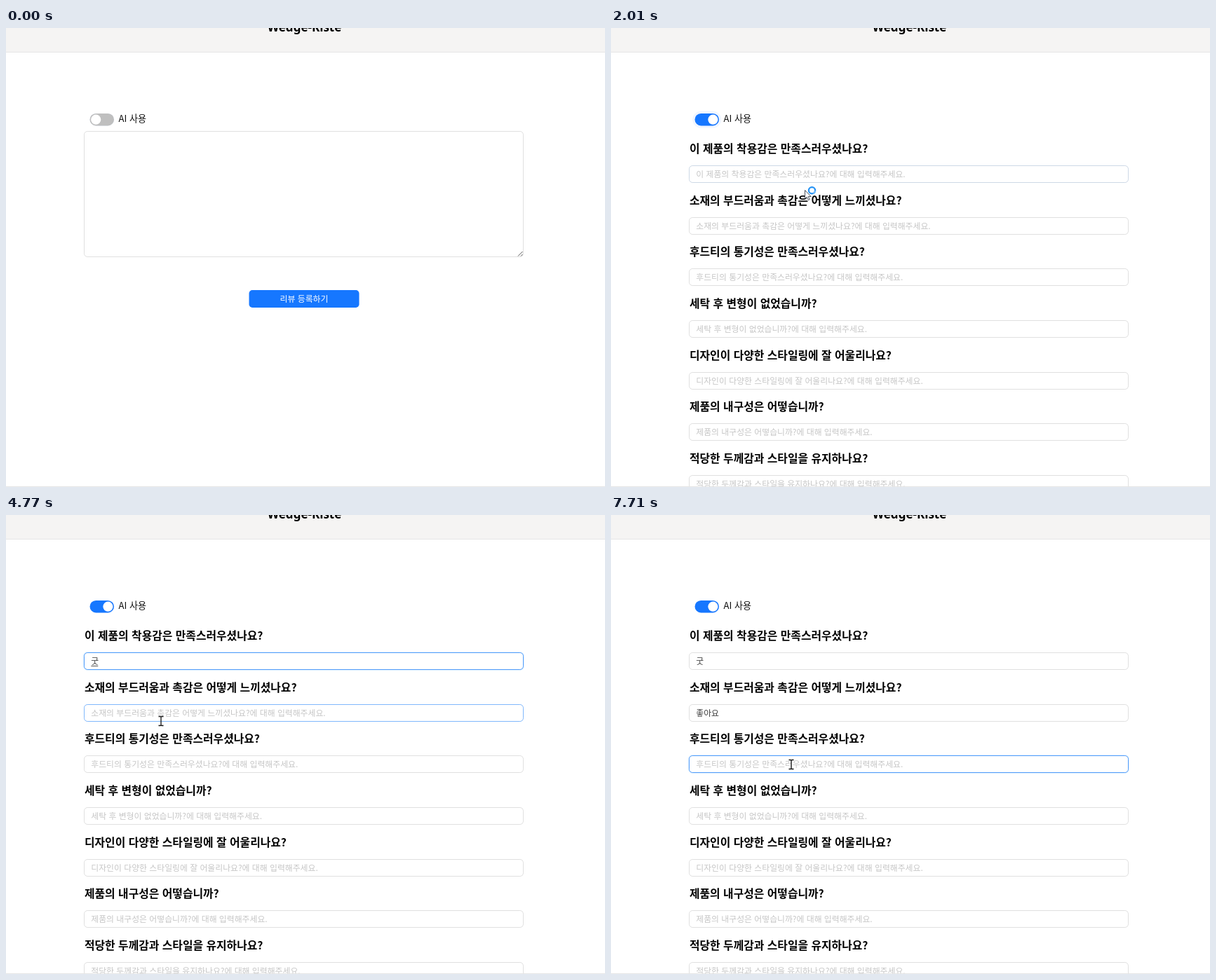
Recreate the animation shown at these times as an HTML page. Size 854 by 655 pixels, loop 8000 ms.

```html
<!DOCTYPE html>
<html lang="ko">
<head>
<meta charset="utf-8">
<title>리뷰 등록</title>
<style>
  html, body { margin: 0; width: 100%; height: 100%; overflow: hidden; background: #fff; }
  svg { display: block; font-family: "Noto Sans CJK KR", "Noto Sans CJK", sans-serif; }
  .title { font: 700 17px "Noto Sans", sans-serif; text-anchor: middle; }
  .question { font-size: 15.83px; font-weight: 700; }
  .field { font-size: 11.86px; }
  .label { font-size: 13.1px; }
</style>
</head>
<body>
<svg id="stage" width="854" height="655" viewBox="0 0 854 655"></svg>
<script>
const LOOP = 8000, TOGGLE = 1740, SYLLABLE = 10.9, TEXT_X = 121.3;
const QUESTIONS = [
  '이 제품의 착용감은 만족스러우셨나요?',
  '소재의 부드러움과 촉감은 어떻게 느끼셨나요?',
  '후드티의 통기성은 만족스러우셨나요?',
  '세탁 후 변형이 없었습니까?',
  '디자인이 다양한 스타일링에 잘 어울리나요?',
  '제품의 내구성은 어떻습니까?',
  '적당한 두께감과 스타일을 유지하나요?'
];
const FOCUS = [[2650, 5000], [5000, 7200], [7200, LOOP]];
const TYPING = [
  [[3150, 'ㄱ'], [3240, '구'], [3330, '굿']],
  [[5760, 'ㅈ'], [5840, '조'], [5920, '좋'], [6070, '좋ㅇ'], [6210, '좋아'], [6290, '좋앙'], [6380, '좋아요']],
  []
];
// time, x, y
const POINTER = [
  [170, 775, 639], [300, 720, 592], [667, 361, 287], [800, 212, 172], [910, 145, 137],
  [960, 142, 133], [1150, 138, 128], [1790, 138, 128], [2000, 276, 231],
  [2100, 276, 231], [2640, 284, 216], [4240, 284, 216], [4650, 221, 294],
  [5000, 221, 294], [5140, 223, 289], [6850, 223, 289], [7180, 256.5, 356]
];
const BORDER = [224, 224, 224], HOVER = [128, 184, 252], ACTIVE = [84, 157, 250];
const BLUE = [22, 119, 255], LIGHT_BLUE = [64, 150, 255], GREY = [191, 191, 191];

const stage = document.getElementById('stage');

function set(el, attrs) {
  for (const key in attrs) el.setAttribute(key, attrs[key]);
  return el;
}
function add(parent, tag, attrs, text) {
  const el = set(document.createElementNS('http://www.w3.org/2000/svg', tag), attrs);
  if (text) el.textContent = text;
  return parent.appendChild(el);
}
const show = (el, on) => { el.style.display = on ? '' : 'none'; };
const clamp = v => Math.max(0, Math.min(1, v));
const smooth = v => v * v * (3 - 2 * v);
const easeOutCirc = v => Math.sqrt(1 - (1 - v) ** 2);
const rgb = c => `rgb(${c.map(Math.round)})`;
const mix = (a, b, k) => a.map((v, i) => v + (b[i] - v) * k);
const inside = (p, b) => p[0] >= b[0] && p[0] <= b[0] + b[2] && p[1] >= b[1] && p[1] <= b[1] + b[3];

function pointerAt(t) {
  const i = POINTER.findIndex(p => p[0] > t);
  if (i < 0) return POINTER.at(-1).slice(1);
  if (i === 0) return POINTER[0].slice(1);
  const [t0, ...from] = POINTER[i - 1], [t1, ...to] = POINTER[i];
  const k = (t - t0) / (t1 - t0);
  return mix(from, to, t < 960 ? k : smooth(k));
}

// Share of the last 200 ms spent over a box: a colour transition without state.
function hoverAmount(box, t) {
  let sum = 0;
  for (let i = 0; i < 10; i++) sum += inside(pointerAt(t - i * 20), box);
  return sum / 10;
}

// Page
add(stage, 'rect', { width: 854, height: 34, fill: '#f5f4f3' });
add(stage, 'rect', { y: 34, width: 854, height: 1, fill: '#e6e6e6' });
add(stage, 'text', { x: 425.5, y: 5, class: 'title' }, 'Wedge-Kiste');

// Switch
const SWITCH_HIT = [122, 124, 30, 12];
const halo = add(stage, 'rect', { fill: rgb(BLUE) });
const track = add(stage, 'rect', { x: 119.5, y: 122, width: 34.5, height: 17.4, rx: 8.7 });
const knob = add(stage, 'circle', { cy: 130.7, r: 7.1, fill: '#fff' });
add(stage, 'text', { x: 160.5, y: 134, class: 'label', fill: '#111' }, 'AI 사용');

// Plain review form
const AREA = [111.5, 147.5, 626, 179], BUTTON = [346.5, 374, 157, 25];
const plainForm = add(stage, 'g', {});
const area = add(plainForm, 'rect', { x: 111.5, y: 147.5, width: 626, height: 179, rx: 4.7, fill: '#fff' });
add(plainForm, 'path', { d: 'M730 325.5l6.5-6.5M734 325.5l2.5-2.5', stroke: '#555', fill: 'none' });
const button = add(plainForm, 'rect', { x: 346.5, y: 374, width: 157, height: 25, rx: 4.7 });
add(plainForm, 'text', { x: 425, y: 390.8, class: 'field', fill: '#fff', 'text-anchor': 'middle' }, '리뷰 등록하기');

// Guided form
const guidedForm = add(stage, 'g', {});
const inputs = QUESTIONS.map((question, i) => {
  const top = 196 + 73.66 * i, y = Math.round(top);
  const frame = { x: 111.5, y: y + 0.5, width: 626, height: 24, rx: 4.7 };
  add(guidedForm, 'text', { x: 112, y: top - 18, class: 'question' }, question);
  return {
    box: [111.5, y, 626, 25],
    ring: add(guidedForm, 'rect', { ...frame, fill: 'none', stroke: '#0591ff', 'stroke-width': 3 }),
    border: add(guidedForm, 'rect', { ...frame, fill: '#fff' }),
    hint: add(guidedForm, 'text', { x: TEXT_X, y: y + 16.8, class: 'field', fill: '#c6c6c6' },
      question + '에 대해 입력해주세요.'),
    value: add(guidedForm, 'text', { x: TEXT_X, y: y + 16.8, class: 'field', fill: '#3c3c3c' }),
    underline: add(guidedForm, 'rect', { y: y + 19, width: 10, height: 1, fill: '#555' }),
    caret: add(guidedForm, 'rect', { y: y + 5, width: 1, height: 15, fill: '#333' })
  };
});

add(stage, 'rect', { y: 654, width: 854, height: 1, fill: '#e6e6e6' });

// Pointer shapes
const pointer = add(stage, 'g', {});
const outline = { fill: '#fff', stroke: '#38404c', 'stroke-width': 0.9, 'stroke-linejoin': 'round' };
const arrow = add(pointer, 'path', { ...outline, d: 'M.5.5v12.3l2.9-2.6 2 4.4 1.9-.9-2-4.2h3.9z' });
const hand = add(pointer, 'path', { ...outline,
  d: 'M-1 0q1-1 2 0v5l5 1.2q1.5.5 1.2 2.5l-.8 5H0l-4-5.2q0-1.8 3 .2z' });
const beam = add(pointer, 'path', { d: 'M-3.5-6.5h2.5l1 .8 1-.8h2.5M0-6V6M-3.5 6.5h2.5l1-.8 1 .8h2.5',
  stroke: '#111', 'stroke-width': 1.3, fill: 'none' });
const busy = add(pointer, 'g', {});
add(busy, 'circle', { cx: 10.5, cy: 0.7, r: 4.6, fill: '#fff', stroke: '#2492f5', 'stroke-width': 2.3 });
const glint = add(busy, 'circle', { cx: 10.5, cy: 0.7, r: 4.6, fill: 'none', stroke: '#6fbcff',
  'stroke-width': 2.3, 'stroke-dasharray': '5 24' });

function drawSwitch(t) {
  const k = smooth(clamp((t - TOGGLE) / 200));
  const over = hoverAmount(SWITCH_HIT, t);
  const color = mix(mix(GREY, [140, 140, 140], over), mix(BLUE, LIGHT_BLUE, over), k);
  track.setAttribute('fill', rgb(color));
  knob.setAttribute('cx', 128.2 + 17.2 * k);
  const spread = 3.4 * easeOutCirc(clamp((t - TOGGLE) / 400));
  const opacity = 0.13 * (1 - easeOutCirc(clamp((t - TOGGLE) / 2000)));
  set(halo, { x: 119.5 - spread, y: 122 - spread, width: 34.5 + 2 * spread,
    height: 17.4 + 2 * spread, rx: 8.7 + spread, opacity });
}

function drawInput(input, i, t) {
  const [start, end] = FOCUS[i] || [Infinity, Infinity];
  const keys = (TYPING[i] || []).filter(k => k[0] <= t);
  const [typedAt, text] = keys.at(-1) || [start, ''];
  const focused = t >= start && t < end;
  const glow = clamp((t - start) / 160) * (1 - clamp((t - end) / 160));
  const over = hoverAmount(input.box, t);
  input.border.setAttribute('stroke', rgb(mix(mix(BORDER, HOVER, over), ACTIVE, glow)));
  input.ring.setAttribute('opacity', 0.12 * glow);
  show(input.hint, !text);
  input.value.textContent = text;
  input.underline.setAttribute('x', TEXT_X + (text.length - 1) * SYLLABLE);
  show(input.underline, focused && text);
  input.caret.setAttribute('x', Math.round(121 + text.length * SYLLABLE - (text ? 0.8 : 0)));
  show(input.caret, focused && t < typedAt + 500);
}

function drawPointer(t, guided) {
  const p = pointerAt(t);
  const fields = guided ? inputs.map(i => i.box) : [AREA];
  const onText = fields.some(b => inside(p, b));
  const onButton = inside(p, SWITCH_HIT) || (!guided && inside(p, BUTTON));
  const onPage = !onText && !onButton;
  pointer.setAttribute('transform', `translate(${p.map(Math.round)})`);
  show(pointer, t >= 170);
  show(beam, onText);
  show(hand, onButton);
  show(arrow, onPage);
  show(busy, onPage && guided && t < FOCUS[0][0]);
  glint.setAttribute('transform', `rotate(${t * 0.36} 10.5 0.7)`);
}

function draw(now) {
  const t = now % LOOP, guided = t >= TOGGLE;
  show(plainForm, !guided);
  show(guidedForm, guided);
  drawSwitch(t);
  if (guided) inputs.forEach((input, i) => drawInput(input, i, t));
  else {
    area.setAttribute('stroke', rgb(mix(BORDER, HOVER, hoverAmount(AREA, t))));
    button.setAttribute('fill', rgb(mix(BLUE, LIGHT_BLUE, hoverAmount(BUTTON, t))));
  }
  drawPointer(t, guided);
}

const began = performance.now();
function tick() {
  draw(performance.now() - began);
  requestAnimationFrame(tick);
}
tick();
</script>
</body>
</html>
```
